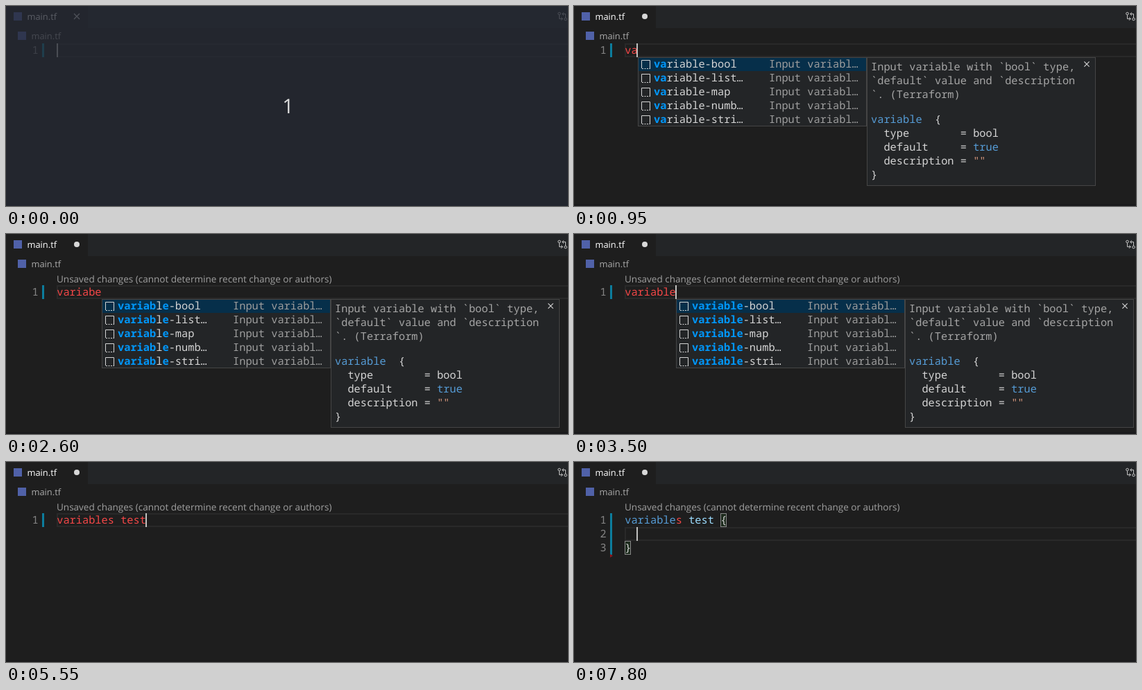
An HTML page that plays this animation: 810x289 px, repeating every 8 s.

```html
<!DOCTYPE html>
<html lang="en">
<head>
<meta charset="utf-8">
<title>main.tf</title>
<style>
html, body { margin: 0; width: 100%; height: 100%; overflow: hidden; background: #1e1e1e; }
svg { display: block; width: 810px; height: 289px; }
text { white-space: pre; text-rendering: geometricPrecision; font-variant-ligatures: none; }
.code { font: 15.333px "Noto Sans Mono", "DejaVu Sans Mono", monospace; }
.ui { font: 12.9px "Open Sans", "Noto Sans", sans-serif; }
.lens { font-size: 13.52px; }
.count { font: 29px "Open Sans", "Noto Sans", sans-serif; text-anchor: middle; }
.hit { fill: #0097fb; font-weight: 700; }
</style>
</head>
<body>
<svg id="stage" viewBox="0 0 810 289"></svg>
<script>
const LOOP = 8000, CHAR = 9.2, LEFT = 73.2;
const RED = "#f44747", BLUE = "#569cd6", PLAIN = "#d4d4d4", DIM = "#9d9d9d";
const PANEL = "#232527", EDGE = "#454545";

const block = (name, type, value) => [
  name + "  {", "  type        = " + type, "  default     = " + value, '  description = ""', "}"];
const POPUPS = {
  all: {
    labels: ["variable-bool", "variable-list…", "variable-map", "variable-numb…", "variable-stri…"],
    detail: "Input variabl…",
    info: ["Input variable with `bool` type,", "`default` value and `description", "`. (Terraform)"],
    code: block("variable", "bool", "true")
  },
  some: {
    labels: ["variable-stri…", "variable-list…"],
    detail: "Input variabl…",
    info: ["Input variable with `string`", "type, `default` value and", "`description`. (Terraform)"],
    code: block("variable", "string", '""')
  },
  settings: {
    labels: ["terraform"],
    detail: "Terraform con…",
    info: ["Terraform configuration block", "with version. (Terraform)"],
    code: ["terraform  {", '  required_version = ""', "}"]
  }
};

// Each step changes part of the state from its time on.
const type = (text, more) => ({ text, caret: true, ...more });
const off = { caret: false };
const steps = [
  [0, type("", { countdown: true })],
  [200, { countdown: false }],
  [300, off],
  [800, type("v", { dirty: true })],
  [900, type("va")],
  [950, { popup: "all" }],
  [1250, type("var", { lens: true })],
  [1450, type("vari")],
  [1650, type("varia")],
  [1750, type("variab")],
  [2100, type("variabe")],
  [2600, off],
  [2700, type("variab")],
  [3150, off],
  [3350, type("variabl")],
  [3500, type("variable")],
  [3700, type("variables", { popup: "some" })],
  [4200, off],
  [4400, type("variables ", { popup: "" })],
  [4900, off],
  [5100, type("variables t")],
  [5200, type("variables te", { popup: "settings" })],
  [5400, type("variables tes", { popup: "" })],
  [5550, type("variables test")],
  [6100, off],
  [6400, type("variables test ")],
  [6800, type("variables test {", { closed: true })],
  [6850, { pair: true }],
  [6900, { parsed: true }],
  [7350, off],
  [7600, { caret: true, split: true }],
  [7800, { marked: true }]
];

const rect = (x, y, w, h, fill, more = "") =>
  `<rect x="${x}" y="${y}" width="${w}" height="${h}" fill="${fill}" ${more}/>`;
const frame = (x, y, w, h, stroke, fill) =>
  rect(x + .5, y + .5, w - 1, h - 1, fill, `stroke="${stroke}"`);
const path = (d, stroke, more = "") => `<path d="${d}" fill="none" stroke="${stroke}" ${more}/>`;
const text = (x, y, str, fill, cls = "code") =>
  `<text x="${x}" y="${y}" fill="${fill}" class="${cls}">${str}</text>`;
const span = (str, fill) => `<tspan fill="${fill}">${str}</tspan>`;
const cross = (x, y, r, color) =>
  path(`M${x - r} ${y - r}l${2 * r} ${2 * r}m0 ${-2 * r}l${-2 * r} ${2 * r}`, color, 'stroke-width="1.2"');
const column = n => LEFT + CHAR * n;
const lineTop = s => s.lens ? 74 : 54;

function header(dirty) {
  return rect(118, 0, 692, 32, PANEL) +
    rect(11, 9, 12, 12, "#5061a8") + text(30.4, 19.7, "main.tf", "#fff", "ui") +
    (dirty ? '<circle cx="102" cy="15" r="4" fill="#d8d8d8"/>' : cross(102, 15, 4, "#d0d0d0")) +
    path("M797.5 13v5.5h4.5m-2-2.3l2.3 2.3l-2.3 2.3M806.5 17v-5.5h-4.5m2-2.3l-2.3 2.3l2.3 2.3", "#c5c5c5") +
    '<g fill="none" stroke="#c5c5c5"><circle cx="797.5" cy="11" r="1.8"/><circle cx="806.5" cy="19" r="1.8"/></g>' +
    rect(17, 37, 12, 12, "#5061a8") + text(36.4, 47.7, "main.tf", "#a9a9a9", "ui");
}

// Marks the letters of a label that match the typed word in order.
function match(label, word) {
  let i = 0;
  return label.replace(/./gu, c => c === word[i] ? (i++, `<tspan class="hit">${c}</tspan>`) : c);
}

function popup({ labels, detail, info, code }, typed, y) {
  const x = Math.round(column(typed.length));
  const word = typed.split(" ").pop();
  const height = (info.length + code.length) * 20 + 26;
  let out = frame(x, y, 330, labels.length * 20, EDGE, PANEL) +
    rect(x + 1, y + 1, 328, 19, "#062f4a");
  labels.forEach((label, i) => {
    const top = y + i * 20;
    out += path(`M${x + 5.5} ${top + 16}v-11.5h12v11.5`, PLAIN) +
      path(`M${x + 6} ${top + 16.5}h12`, PLAIN, 'stroke-dasharray="2 1.5"') +
      text(x + 23, top + 14.5, match(label, word), PLAIN) +
      text(x + 189, top + 14.5, detail, DIM);
  });
  out += frame(x + 330, y, 330, height, EDGE, PANEL);
  info.forEach((line, i) => out += text(x + 336, y + 19 + i * 20, line, "#a5a5a5"));
  code.forEach((line, i) => {
    const colored = line.replace(/^\w+|true|""/g, m => span(m, m === '""' ? "#ce9178" : BLUE));
    out += text(x + 336, y + 35 + (info.length + i) * 20, colored, PLAIN);
  });
  return out + cross(x + 647, y + 10, 3.6, PLAIN);
}

function bracketBox(n, y) {
  const x = Math.round(column(n));
  return frame(x, y, Math.round(column(n + 1)) - x, 20, "#888", "#1d2b1d");
}

function editor(s) {
  const top = lineTop(s), active = s.split ? top + 20 : top;
  const caretColumn = s.split ? 2 : s.text.length;
  const closeColumn = s.split ? 0 : 16, last = s.split ? top + 40 : top;
  let out = rect(74, active + 1, 740, 18, "none", 'stroke="#292929" stroke-width="2"');
  if (s.lens)
    out += text(73, 69.7, "Unsaved changes (cannot determine recent change or authors)", "#a0a0a0", "ui lens");
  for (let i = 0; i < (s.split ? 3 : 1); i++)
    out += text(37.6, top + 14.5 + i * 20, i + 1, "#858585");
  out += rect(52, top, 3, s.marked ? 60 : 20, "#0c7d9d");
  if (s.marked) out += '<path d="M52 133v5l4-2.5z" fill="#94151b"/>';
  if (s.pair) out += bracketBox(15, top) + bracketBox(closeColumn, last);
  const line = s.parsed
    ? span("variable", BLUE) + span("s", RED) + span(" test", "#9cdcfe") + span(" {", PLAIN)
    : s.text;
  out += text(LEFT, top + 14.5, line, RED);
  if (s.closed)
    out += text(column(closeColumn), last + 14.5, "}", s.parsed ? PLAIN : RED);
  if (s.caret)
    out += rect(Math.max(73, Math.floor(column(caretColumn) - .7)), active, 2, 20, "#c0c0be");
  return out;
}

function draw(s) {
  stage.innerHTML = rect(0, 0, 810, 289, "#1e1e1e") + header(s.dirty) + editor(s) +
    rect(0, 286, 810, 3, "#1a1a1c") +
    (s.popup ? popup(POPUPS[s.popup], s.text, lineTop(s) + 20) : "") +
    (s.countdown ? rect(0, 0, 810, 289, "#262a34", 'opacity=".76"') +
      text(406.5, 155, "1", "#dcdcdc", "count") : "");
}

const stage = document.getElementById("stage");
const start = performance.now();
let shown = -1;
function tick() {
  const t = (performance.now() - start) % LOOP;
  const count = steps.filter(([at]) => at <= t).length;
  if (count !== shown) {
    shown = count;
    draw(Object.assign({}, ...steps.slice(0, count).map(step => step[1])));
  }
  requestAnimationFrame(tick);
}
tick();
</script>
</body>
</html>
```
